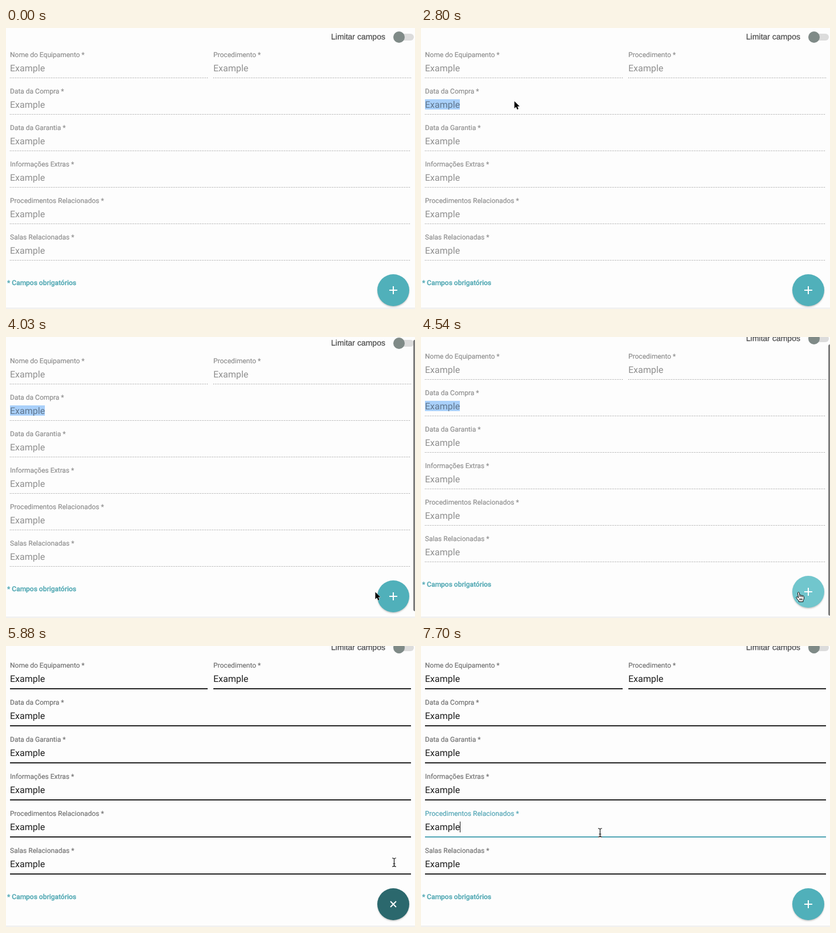
Write an HTML page that moves like this. It is 716 px wide and 493 px high and loops after 8000 ms.

```html
<!DOCTYPE html>
<html lang="pt">
<head>
<meta charset="utf-8">
<title>Formulário</title>
<style>
  html, body { margin: 0; width: 100%; height: 100%; overflow: hidden; background: #fdfdfd; }
  svg { display: block; width: 716px; height: 493px; }
  text { font-family: Roboto, sans-serif; white-space: pre; text-rendering: geometricPrecision; }
  .label { font-size: 12px; stroke-width: .2px; }
  .value { font-size: 16px; }
  .limit { font: 14px "Liberation Sans", Arial, sans-serif; fill: #4c4c4c; stroke: #4c4c4c; stroke-width: .25px; }
  .note { font-size: 12px; font-weight: 500; fill: #53a9b4; stroke: #53a9b4; stroke-width: .3px; }
</style>
</head>
<body>
<svg viewBox="0 0 716 493">
  <defs>
    <filter id="blur" x="-40%" y="-40%" width="180%" height="180%"><feGaussianBlur stdDeviation="1.4"/></filter>
  </defs>
  <rect width="716" height="493" fill="#fdfdfd"/>
  <g id="page">
    <text class="limit" x="569" y="20">Limitar campos</text>
    <rect x="680" y="10" width="34" height="12" rx="6" fill="#dcdcdc"/>
    <circle cx="688" cy="16" r="10" fill="#7f8a87"/>
    <rect id="selection" x="7" width="61" height="18" fill="#a9d0fa"/>
    <g id="fields"></g>
    <rect id="caret" x="68" width="1" height="19" fill="#111"/>
    <g id="footer">
      <text class="note" x="2" y="451">* Campos obrigatórios</text>
      <g transform="translate(678 460)">
        <circle id="shadow" cy="1.6" r="27.5" fill="#000" filter="url(#blur)"/>
        <circle id="fab" r="28"/>
        <path id="plus" d="M-7 0H7M0 -7V7" stroke="#fff" stroke-width="2"/>
      </g>
    </g>
  </g>
  <path d="M0 491.5H716" stroke="#e2e2e2"/>
  <rect id="scrollbar" x="713" width="6" height="476" rx="3" fill="#7d7d7d"/>
  <g id="pointer">
    <path id="arrow" d="M.5 .5V13L3.4 10.3L5.4 15L7.6 14L5.6 9.5H9.6Z" fill="#000" stroke="#fff" stroke-width="1" paint-order="stroke"/>
    <path id="hand" d="M-1.6 1.6Q-.2 -.4 1.2 1.6L2 6Q3.5 5 4.4 6.4Q6 5.6 6.8 7Q9 6.6 9.4 8.6V12Q9 14 8 15.2V17.5H.4V16Q-2 13.5 -4 10.5Q-4.2 8.6 -2.3 8.8L-.2 10.8ZM2 6V9M4.4 6.4V9.3M6.8 7.2V9.6M2 11.5V15M4 11.5V15M6 11.5V15" fill="#fff" stroke="#000" stroke-linejoin="round"/>
    <g id="beam" fill="none">
      <path d="M-3.5 -7.5Q0 -7.5 0 -5.5Q0 -7.5 3.5 -7.5M0 -6V6M-3.5 7.5Q0 7.5 0 5.5Q0 7.5 3.5 7.5M-2 2.5H2" stroke="#fff" stroke-width="2.4"/>
      <path d="M-3.5 -7.5Q0 -7.5 0 -5.5Q0 -7.5 3.5 -7.5M0 -6V6M-3.5 7.5Q0 7.5 0 5.5Q0 7.5 3.5 7.5M-2 2.5H2" stroke="#111" stroke-width="1.2"/>
    </g>
  </g>
</svg>
<script>
const LOOP = 8000, ENABLED_AT = 5880;
const TEAL = [80, 176, 186], LIGHT = [113, 198, 205], DARK = [43, 104, 109];
const FOCUS = [78, 163, 179], INK = [33, 33, 33], GREY = [112, 112, 112];
const $ = id => document.getElementById(id);
const set = (el, attrs) => { for (const k in attrs) el.setAttribute(k, attrs[k]); };
const show = (el, on) => set(el, { visibility: on ? 'visible' : 'hidden' });
const rgb = c => `rgb(${c.map(Math.round)})`;
const smooth = u => u * u * (3 - 2 * u);
const mix = (a, b, u) => a.map((v, i) => v + (b[i] - v) * u);

// Keys are [time, value array, optional easing into that key].
function track(t, keys) {
  const i = keys.findIndex(k => k[0] > t);
  if (i === 0) return keys[0][1];
  if (i < 0) return keys[keys.length - 1][1];
  const [t0, a] = keys[i - 1], [t1, b, ease = smooth] = keys[i];
  return mix(a, b, ease((t - t0) / (t1 - t0)));
}

function add(parent, tag, attrs, content = '') {
  const el = document.createElementNS('http://www.w3.org/2000/svg', tag);
  set(el, attrs);
  el.textContent = content;
  return parent.appendChild(el);
}

const fields = [
  ['Nome do Equipamento', 0, 7, 353], ['Procedimento', 0, 363, 709],
  ['Data da Compra', 1], ['Data da Garantia', 2], ['Informações Extras', 3],
  ['Procedimentos Relacionados', 4], ['Salas Relacionadas', 5]
].map(([name, row, left = 7, right = 709]) => {
  const g = add($('fields'), 'g', {});
  return {
    row, left, right, g,
    label: add(g, 'text', { class: 'label', x: left, y: 51 }, name + ' *'),
    value: add(g, 'text', { class: 'value', x: left, y: 76 }, 'Example'),
    line: add(g, 'path', {})
  };
});

const POINTER = [
  [470, [285, -5]], [650, [129, 41]],
  [850, [129, 41]], [1000, [86, 72]],
  [1780, [86, 72]], [2040, [109, 127]],
  [2660, [109, 127]], [2800, [161, 127], u => u * u], [2990, [455, 253], u => 1 - (1 - u) ** 1.6],
  [3200, [455, 253]], [3560, [646, 447]],
  [4390, [646, 447]], [4540, [661, 447]],
  [5220, [661, 447]], [5410, [679, 379]],
  [5880, [679, 379]], [6410, [400, 383]],
  [7140, [400, 383]], [7450, [313, 327]]
];
const FAB = [
  [4390, TEAL], [4540, LIGHT], [5230, LIGHT], [5410, TEAL],
  [5729, TEAL], [5730, DARK], [5880, DARK], [6410, TEAL]
];

function focusAmount(row, t) {
  const last = track(t, [[7450, [0]], [7650, [1]]])[0];
  if (row === 4) return last;
  if (row === 5) return track(t, [[6620, [0]], [6850, [1]]])[0] - last;
  return 0;
}

function drawField(f, t, enabled, pitch) {
  const focus = focusAmount(f.row, t);
  const labelColor = enabled ? rgb(mix(GREY, FOCUS, focus)) : '#8e8e8e';
  set(f.g, { transform: `translate(0 ${f.row * pitch})` });
  set(f.label, { fill: labelColor, stroke: labelColor });
  set(f.value, { fill: enabled ? '#1c1c1c' : 'rgba(0,0,0,.44)' });
  set(f.line, {
    d: `M${f.left} ${enabled ? 88 : 87.5}H${f.right}`,
    stroke: enabled ? rgb(mix(INK, FOCUS, focus)) : '#777',
    'stroke-width': enabled ? 2 : 1,
    'stroke-dasharray': enabled ? 'none' : '1 2'
  });
}

function draw(t) {
  const enabled = t >= ENABLED_AT, pitch = enabled ? 65 : 64;
  const scroll = Math.round(track(t, [[3960, [0]], [4120, [13]]])[0]);
  set($('page'), { transform: `translate(0 ${-scroll})` });
  set($('footer'), { transform: `translate(0 ${enabled ? 6 : 0})` });
  fields.forEach(f => drawField(f, t, enabled, pitch));

  show($('selection'), t >= 1450 && t < 2180 || t >= 2360 && t < 5730);
  set($('selection'), { y: t < 2180 ? 61 : 125 });
  show($('caret'), t >= 6650);
  set($('caret'), { y: 61 + pitch * (t < 7450 ? 5 : 4) });

  const raised = t >= 5730 && t < ENABLED_AT;
  const angle = track(t, [[5879, [0]], [5880, [45]], [6410, [90]]])[0];
  set($('fab'), { fill: rgb(track(t, FAB)) });
  set($('shadow'), { r: raised ? 30 : 27.5, opacity: raised ? .35 : .28 });
  set($('plus'), { transform: `rotate(${angle})` });

  set($('scrollbar'), {
    y: scroll,
    opacity: t < 3990 ? 0 : track(t, [[4650, [1]], [5120, [0]]])[0]
  });

  const [x, y] = track(t, POINTER).map(Math.round);
  const shape = t >= 5730 ? 'beam' : t >= 4500 && t < 5590 ? 'hand' : 'arrow';
  const nudge = shape === 'beam' ? .5 : 0;
  set($('pointer'), { transform: `translate(${x + nudge} ${y + nudge})` });
  for (const id of ['arrow', 'hand', 'beam']) show($(id), id === shape && t >= 500);
}

const start = performance.now();
function tick(now) {
  draw(Math.max(0, now - start) % LOOP);
  requestAnimationFrame(tick);
}
draw(0);
requestAnimationFrame(tick);
</script>
</body>
</html>
```
